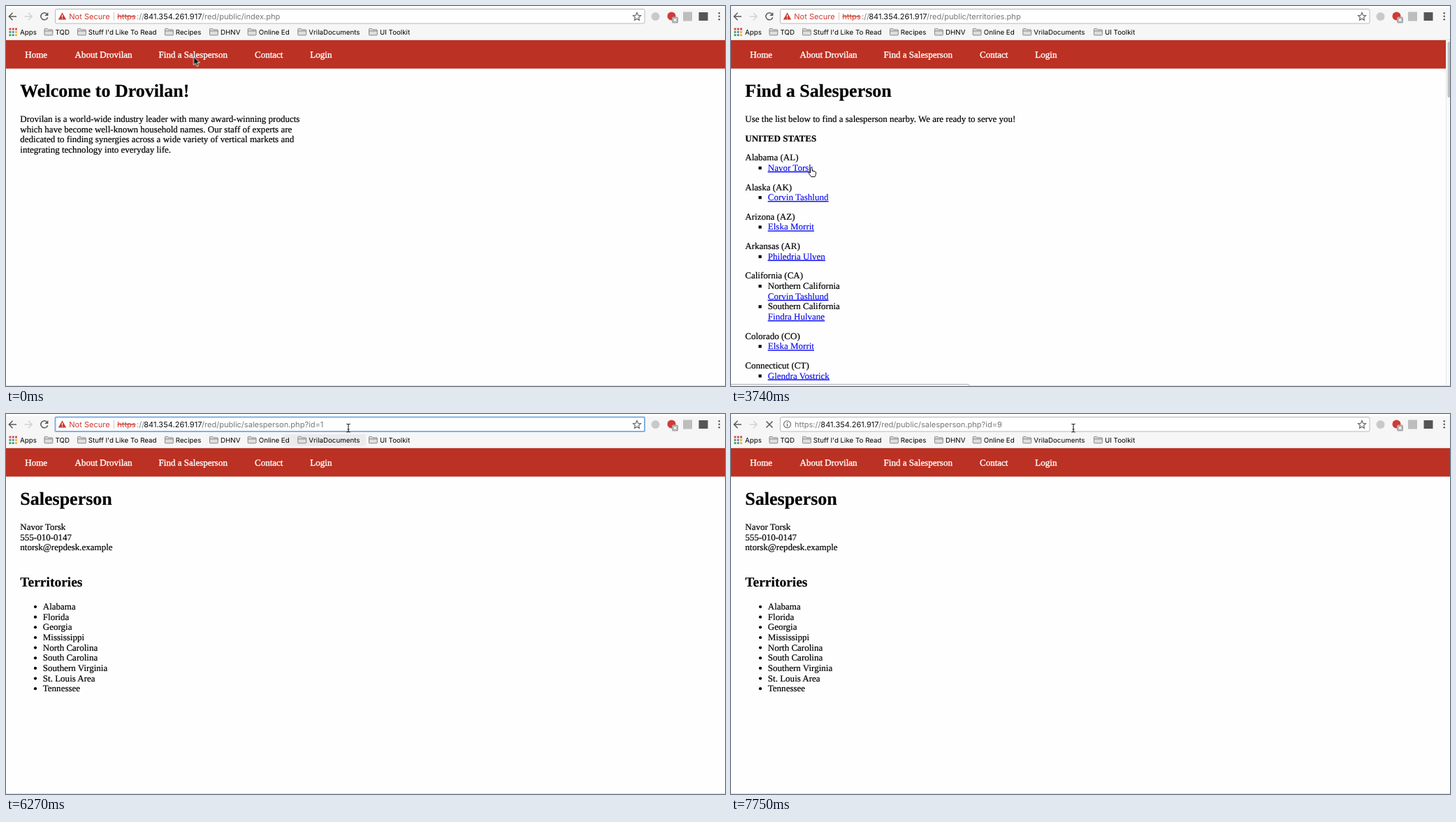
Animation of 1029 by 544 pixels, one loop 8000 ms. Source, as an HTML page:

```html
<!DOCTYPE html>
<html lang="en">
<head>
<meta charset="utf-8">
<title>Browsing a staff directory</title>
<style>
html, body { margin: 0; width: 100%; height: 100%; overflow: hidden; background: #fefefe; }
svg { display: block; width: 100%; height: 100%; text-rendering: geometricPrecision; }
.page { font: 13.02px "Liberation Serif", "Times New Roman", serif; color: #000; }
.page text { fill: currentColor; stroke: currentColor; stroke-width: .2px; }
.page .h1 { font-size: 26px; font-weight: 700; }
.page .h2 { font-size: 19.5px; font-weight: 700; }
.page .link { color: #0000ee; stroke-width: .1px; text-decoration: underline; }
.page .nav text { color: #fff; stroke-width: .35px; }
.b { font-weight: 700; }
.url { font: 11.05px Inter, "Open Sans", sans-serif; fill: #777; }
.marks { font: 9.75px Inter, "Open Sans", sans-serif; fill: #000; }
.host { fill: #111; }
.red { fill: #cf3a2e; }
.strike { text-decoration: line-through; }
.hit { fill: #2c5cd6; }
.hit .b { font-size: 11.4px; }
.line { fill: none; stroke: #5a5a5a; stroke-width: 1.5; }

/* everything that comes and goes */
.k { opacity: 0; animation: 8s step-end infinite; }
.home { animation-name: home; }
.list { animation-name: list; }
.person { animation-name: person; }
.idone { animation-name: idone; }
.warn { animation-name: warn; }
.edit { animation-name: edit; }
.empty { animation-name: empty; }
.nine { animation-name: nine; }
.done { animation-name: done; }
.star { animation-name: star; }
.stop { animation-name: stop; }
.reload { animation-name: reload; }
.status { animation-name: status; }
.hover { animation-name: hover; }
.ring { animation-name: ring; }
.picked { animation-name: picked; }
.caret { animation-name: caret; }
.tall { animation-name: tall; }
.short { animation-name: short; }
.arrow { animation-name: arrow; }
.hand { animation-name: hand; }
.beam { animation-name: beam; }
.pointer { animation: move 8s step-end infinite; }

@keyframes home { 0% { opacity: 1 } 35.625%, 100% { opacity: 0 } }
@keyframes list { 0% { opacity: 0 } 35.625% { opacity: 1 } 50.5%, 100% { opacity: 0 } }
@keyframes person { 0% { opacity: 0 } 50.5%, 100% { opacity: 1 } }
@keyframes idone { 0% { opacity: 0 } 50.5% { opacity: 1 } 85.75%, 100% { opacity: 0 } }
@keyframes warn { 0% { opacity: 1 } 85.75%, 100% { opacity: 0 } }
@keyframes edit { 0% { opacity: 0 } 85.75% { opacity: 1 } 96.875%, 100% { opacity: 0 } }
@keyframes empty { 0% { opacity: 0 } 85.75% { opacity: 1 } 89.5%, 100% { opacity: 0 } }
@keyframes nine { 0% { opacity: 0 } 89.5% { opacity: 1 } 96.875%, 100% { opacity: 0 } }
@keyframes done { 0% { opacity: 0 } 96.875%, 100% { opacity: 1 } }
@keyframes star { 0% { opacity: 1 } 85.75% { opacity: 0 } 96.875%, 100% { opacity: 1 } }
@keyframes stop {
  0%, 35.625%, 50.5% { opacity: 0 }
  33.75%, 48.625%, 96.875%, 100% { opacity: 1 }
}
@keyframes reload {
  0%, 35.625%, 50.5% { opacity: 1 }
  33.75%, 48.625%, 96.875%, 100% { opacity: 0 }
}
@keyframes status { 0% { opacity: 0 } 28.125% { opacity: 1 } 56%, 100% { opacity: 0 } }
@keyframes hover { 0% { opacity: 0 } 59.625% { opacity: 1 } 85.75%, 100% { opacity: 0 } }
@keyframes ring { 0% { opacity: 0 } 63.375% { opacity: 1 } 96.875%, 100% { opacity: 0 } }
@keyframes picked { 0% { opacity: 0 } 65.25% { opacity: 1 } 70.875%, 100% { opacity: 0 } }
@keyframes caret {
  0%, 65.25%, 78.375%, 100% { opacity: 0 }
  63.375%, 70.875% { opacity: 1 }
}
@keyframes tall { 0% { opacity: 0 } 85.75% { opacity: 1 } 91.375%, 100% { opacity: 0 } }
@keyframes short { 0% { opacity: 0 } 91.375% { opacity: 1 } 96.875%, 100% { opacity: 0 } }
@keyframes arrow {
  0%, 35.625%, 52.25%, 85.75% { opacity: 1 }
  26.25%, 43.125%, 61.5%, 96.875%, 100% { opacity: 0 }
}
@keyframes hand {
  0%, 35.625%, 52.25%, 100% { opacity: 0 }
  26.25%, 43.125% { opacity: 1 }
}
@keyframes beam {
  0%, 85.75% { opacity: 0 }
  61.5%, 96.875%, 100% { opacity: 1 }
}
@keyframes move {
  0% { transform: translate(268.5px, 72.5px) }
  26.25% { transform: translate(261px, 71.5px) }
  35.625% { transform: translate(222px, 122px) }
  37.5% { transform: translate(166.5px, 186px) }
  39.375% { transform: translate(136px, 213px) }
  41.25% { transform: translate(121px, 226px) }
  43.125% { transform: translate(115px, 231px) }
  54.125% { transform: translate(150px, 202px) }
  56% { transform: translate(262px, 128px) }
  57.875% { transform: translate(398px, 68px) }
  59.625% { transform: translate(472px, 34px) }
  61.5%, 100% { transform: translate(490px, 20px) }
}
</style>
</head>
<body>
<svg viewBox="0 0 1029 544" preserveAspectRatio="none">
<defs>
  <g id="folder" stroke="#7d7d7d" stroke-width=".9">
    <path d="M.5 9V1.2q0-.8.8-.8h3.4l1.2 1.5h5.6q.8 0 .8.8V9q0 .8-.8.8H1.3Q.5 9.8.5 9z" fill="#dedede"/>
    <path d="M.5 3.8h11.8" fill="none"/>
  </g>
  <path id="doc" d="M.5.5h4l2.5 2.5v7H.5zM4.5.5v2.500h2.5" fill="#fff" stroke="#777"/>
  <g id="lens" fill="none" stroke="#777" stroke-width="1.3"><circle cx="3.5" cy="3.5" r="3"/><path d="M5.7 5.7l4 4"/></g>
  <rect id="sq" x="39.5" y="-6" width="4.2" height="4.2"/>
  <circle id="dot" cx="42" cy="-4" r="2.1"/>
</defs>

<rect width="1029" height="544" fill="#fefefe"/>

<!-- pages -->
<g class="page">
  <rect y="49" width="1029" height="40.6" fill="#bb3123"/>
  <g class="nav">
    <text x="27.3" y="74">Home</text>
    <text x="98.5" y="74">About Drovilan</text>
    <text x="218.6" y="74">Find a Salesperson</text>
    <text x="356" y="74">Contact</text>
    <text x="435.3" y="74">Login</text>
  </g>

  <g class="k home">
    <text class="h1" x="20.3" y="130">Welcome to Drovilan!</text>
    <text x="20.3" y="166">Drovilan is a world-wide industry leader with many award-winning products</text>
    <text x="20.3" y="180.7">which have become well-known household names. Our staff of experts are</text>
    <text x="20.3" y="195.3">dedicated to finding synergies across a wide variety of vertical markets and</text>
    <text x="20.3" y="210">integrating technology into everyday life.</text>
  </g>

  <g class="k list">
    <text class="h1" x="20.3" y="130">Find a Salesperson</text>
    <text x="20.3" y="166">Use the list below to find a salesperson nearby. We are ready to serve you!</text>
    <text class="b" x="20.3" y="193.5">UNITED STATES</text>
    <text x="20.3" y="221.2">Alabama (AL)</text>
    <use href="#sq" y="235.8"/><text class="link" x="52.8" y="235.8">Navor Torsk</text>
    <text x="20.3" y="263.5">Alaska (AK)</text>
    <use href="#sq" y="278.1"/><text class="link" x="52.8" y="278.1">Corvin Tashlund</text>
    <text x="20.3" y="305.8">Arizona (AZ)</text>
    <use href="#sq" y="320.4"/><text class="link" x="52.8" y="320.4">Elska Morrit</text>
    <text x="20.3" y="348.1">Arkansas (AR)</text>
    <use href="#sq" y="362.7"/><text class="link" x="52.8" y="362.7">Philedria Ulven</text>
    <text x="20.3" y="390.4">California (CA)</text>
    <use href="#sq" y="405"/><text x="52.8" y="405">Northern California</text>
    <text class="link" x="52.8" y="419.7">Corvin Tashlund</text>
    <use href="#sq" y="434.3"/><text x="52.8" y="434.3">Southern California</text>
    <text class="link" x="52.8" y="449">Findra Hulvane</text>
    <text x="20.3" y="476.6">Colorado (CO)</text>
    <use href="#sq" y="491.2"/><text class="link" x="52.8" y="491.2">Elska Morrit</text>
    <text x="20.3" y="518.9">Connecticut (CT)</text>
    <use href="#sq" y="533.5"/><text class="link" x="52.8" y="533.5">Glendra Vostrick</text>
    <rect x="1023" y="49" width="6" height="495" fill="#fafafa"/>
    <path d="M1023.5 49v495" stroke="#e6e6e6"/>
    <rect x="1025.5" y="51" width="5" height="80" rx="2.5" fill="#c1c1c1"/>
  </g>

  <g class="k person">
    <text class="h1" x="20.3" y="130">Salesperson</text>
    <text x="20.3" y="166">Navor Torsk</text>
    <text x="20.3" y="180.7">555-010-0147</text>
    <text x="20.3" y="195.3">ntorsk@repdesk.example</text>
    <text class="h2" x="20.3" y="247">Territories</text>
    <use href="#dot" y="280"/><text x="52.8" y="280">Alabama</text>
    <use href="#dot" y="294.7"/><text x="52.8" y="294.7">Florida</text>
    <use href="#dot" y="309.3"/><text x="52.8" y="309.3">Georgia</text>
    <use href="#dot" y="324"/><text x="52.8" y="324">Mississippi</text>
    <use href="#dot" y="338.6"/><text x="52.8" y="338.6">North Carolina</text>
    <use href="#dot" y="353.3"/><text x="52.8" y="353.3">South Carolina</text>
    <use href="#dot" y="367.9"/><text x="52.8" y="367.9">Southern Virginia</text>
    <use href="#dot" y="382.6"/><text x="52.8" y="382.6">St. Louis Area</text>
    <use href="#dot" y="397.2"/><text x="52.8" y="397.2">Tennessee</text>
  </g>
</g>
<path d="M0 543.5h1029" stroke="#dcdcdc"/>
<rect class="k status" x="-4" y="541.5" width="345" height="8" rx="2" fill="#efefef" stroke="#b4b4b4"/>

<!-- toolbar -->
<rect y="3" width="1029" height="45.5" fill="#f6f6f6"/>
<path d="M0 48.5h1029" stroke="#e0dddd"/>
<path class="line" d="M15 15H4.5M9.5 9.8L4.3 15l5.2 5.2"/>
<path class="line" d="M26.5 15H37M32 9.8l5.2 5.2-5.2 5.2" style="stroke:#d2d2d2"/>
<g class="k reload">
  <path class="line" d="M58.6 11.4A5 5 0 1 0 59.7 16.2"/>
  <path d="M60.4 9v5h-5z" fill="#5a5a5a"/>
</g>
<path class="k stop line" d="M50.5 10.5l9 9M59.5 10.5l-9 9"/>

<rect x="70.5" y="4.5" width="843.5" height="20.5" rx="2" fill="#fff" stroke="#b9b9b9"/>
<rect class="k ring" x="70.5" y="4.5" width="843.5" height="20.5" rx="1.5" fill="#fff" stroke="#7fb0e6" stroke-width="2"/>
<rect class="k picked" x="159" y="7" width="296.5" height="14" fill="#b4d6fb"/>
<path class="k star" d="M903 9.5l1.6 3.7 4 .4-3 2.7.9 4-3.5-2.1-3.5 2.1.9-4-3-2.7 4-.4z" fill="none" stroke="#5e5e5e" stroke-width="1.1"/>

<g class="url">
  <g class="k warn">
    <path d="M80.5 9.2l5.7 10.3H74.8z" fill="#cf3a2e"/>
    <path d="M80.5 12.6v3.4M80.5 17v1.3" stroke="#fff" stroke-width="1.2"/>
    <text class="red" x="90.3" y="18.7">Not Secure</text>
    <path d="M154.5 9v11.5" stroke="#c8c8c8"/>
    <text y="18.7"><tspan class="red strike" x="159.3">https</tspan><tspan x="187">://</tspan><tspan class="host" x="197.2">841.354.261.917</tspan></text>
    <text class="k home" x="280" y="18.7">/red/public/index.php</text>
    <text class="k list" x="280" y="18.7">/red/public/territories.php</text>
    <text class="k idone" x="280" y="18.7">/red/public/salesperson.php?id=1</text>
  </g>
  <path class="k caret" d="M455.5 7.5v13.5" stroke="#222"/>

  <g class="k edit">
    <use href="#doc" x="77" y="9.5"/>
    <text y="18.7"><tspan x="91">https://</tspan><tspan class="host" x="128.3">841.354.261.917</tspan></text>
  </g>
  <g class="k empty">
    <text x="211.2" y="18.7">/red/public/salesperson.php?id=</text>
    <path d="M381.5 7.5v13.5" stroke="#222"/>
  </g>
  <g class="k nine">
    <text x="211.2" y="18.7">/red/public/salesperson.php?id=9</text>
    <path d="M388.5 7.5v13.5" stroke="#222"/>
  </g>
  <g class="k done">
    <circle cx="80.5" cy="14.8" r="5" fill="none" stroke="#666" stroke-width="1.1"/>
    <path d="M80.5 11.5v1.4M80.5 14v4" stroke="#666" stroke-width="1.3"/>
    <text y="18.7"><tspan x="91">https://</tspan><tspan class="host" x="128.3">841.354.261.917</tspan><tspan x="211.2">/red/public/salesperson.php?id=9</tspan></text>
  </g>
</g>

<circle cx="929.5" cy="15" r="6" fill="#c9c9c9"/>
<circle cx="952.5" cy="14.5" r="6" fill="#cf3b35"/>
<rect x="953" y="15.5" width="9" height="9" rx="1.5" fill="#a9a9a9"/>
<path d="M955.5 18l4 4M959.5 18l-4 4" stroke="#fff" stroke-width="1.2"/>
<rect x="969" y="8.5" width="13" height="13" fill="#bdbdbd"/>
<rect x="991.5" y="9" width="13" height="12" fill="#555"/>
<g fill="#5a5a5a"><circle cx="1020.7" cy="10.3" r="1.3"/><circle cx="1020.7" cy="14.8" r="1.3"/><circle cx="1020.7" cy="19.3" r="1.3"/></g>

<!-- bookmarks -->
<rect class="k hover" x="398" y="29" width="117" height="17" rx="2" fill="#ebebec"/>
<g stroke-width="2.8" stroke-dasharray="2.8 1.5">
  <path d="M4.5 33h11.5" stroke="#dc4b3e"/>
  <path d="M4.5 37.3h2.8" stroke="#3b9a57"/><path d="M8.8 37.3h2.8" stroke="#4a80e8"/><path d="M13.1 37.3h2.8" stroke="#e9b432"/>
  <path d="M4.5 41.6h7.1" stroke="#3b9a57"/><path d="M13.1 41.6h2.8" stroke="#e9b432"/>
</g>
<g class="marks">
  <text x="20" y="40.7">Apps</text>
  <use href="#folder" x="54.5" y="32"/><text x="70.5" y="40.7">TQD</text>
  <use href="#folder" x="102" y="32"/><text x="117.7" y="40.7">Stuff I'd Like To Read</text>
  <use href="#folder" x="227" y="32"/><text x="242.8" y="40.7">Recipes</text>
  <use href="#folder" x="291" y="32"/><text x="307" y="40.7">DHNV</text>
  <use href="#folder" x="345.7" y="32"/><text x="361.7" y="40.7">Online Ed</text>
  <use href="#folder" x="417.3" y="32"/><text x="433.3" y="40.7">VrilaDocuments</text>
  <use href="#folder" x="519" y="32"/><text x="535" y="40.7">UI Toolkit</text>
</g>

<!-- suggestions -->
<g class="url">
  <g class="k tall">
    <rect y="29.5" width="1029" height="109.5" fill="#fff"/>
    <path d="M0 138.5h1029" stroke="#d2d2d2"/>
    <path d="M0 139.5h1029" stroke="#ececec"/>
  </g>
  <g class="k short">
    <rect y="29.5" width="1029" height="48.5" fill="#fff"/>
    <path d="M0 77.5h1029" stroke="#d2d2d2"/>
    <path d="M0 78.5h1029" stroke="#ececec"/>
  </g>
  <g class="k edit">
    <path d="M0 29.5h1029" stroke="#d0d0d0"/>
    <rect y="33.5" width="1029" height="20.3" fill="#ebebeb"/>
    <use href="#doc" x="77" y="39"/>
  </g>
  <g class="k empty">
    <g class="hit">
      <text x="91" y="48"><tspan class="b">https://841.354.261.917/red/public/salesperson.php?id=</tspan></text>
      <text x="91" y="68.3"><tspan class="b">https://841.354.261.917/red/public/salesperson.php?id=</tspan>9</text>
      <text x="91" y="88.6"><tspan class="b">https://841.354.261.917/red/public/salesperson.php?id=</tspan>6</text>
      <text x="91" y="108.9"><tspan class="b">https://841.354.261.917/red/public/salesperson.php?id=</tspan>10</text>
    </g>
    <use href="#doc" x="77" y="59.3"/><use href="#doc" x="77" y="79.6"/><use href="#doc" x="77" y="99.9"/>
    <use href="#lens" x="76" y="120.5"/>
    <text x="91" y="129.2"><tspan class="host">https://841.354.261.917/red/public/salesperson.php?id=</tspan> - Zorvik Search</text>
  </g>
  <g class="k nine">
    <text class="hit" x="91" y="48"><tspan class="b">https://841.354.261.917/red/public/salesperson.php?id=9</tspan></text>
    <use href="#lens" x="76" y="59.6"/>
    <text x="91" y="68.3"><tspan class="host">https://841.354.261.917/red/public/salesperson.php?id=9</tspan> - Zorvik Search</text>
  </g>
</g>

<!-- pointer -->
<g class="pointer">
  <path class="k arrow" d="M0 0v12l2.8-2.6 2 4.6 2.2-1-2-4.4h4z" fill="#111" stroke="#fff" stroke-width=".9"/>
  <path class="k hand" d="M-1.5 1.2q1.3-1.8 2.6 0v3.8l4 .9q1.8.5 1.6 2.2l-.7 3-1 2.4h-5.2l-3.6-5q-.7-1.9 1.3-1.4l1 .9z" fill="#fff" stroke="#111"/>
  <path class="k beam" d="M-2.7-5.8q2.2 0 2.7 1 .5-1 2.7-1M0-4.8v9.8M-2.7 6q2.2 0 2.7-1 .5 1 2.7 1M-1.5 2h3" fill="none" stroke="#222" stroke-width="1.1"/>
</g>
</svg>
</body>
</html>
```
